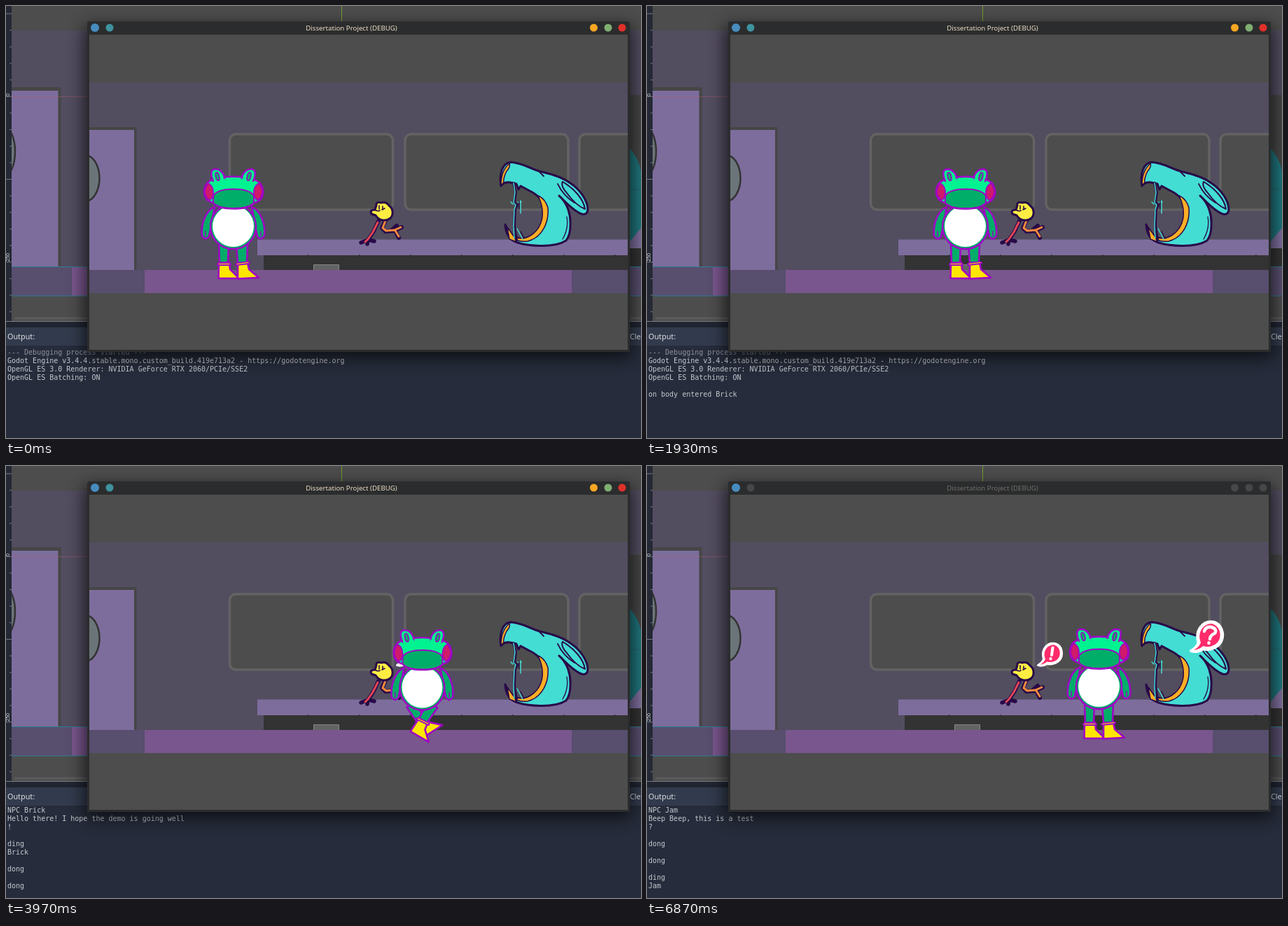
Recreate the animation shown at these times as an HTML page. Size 907 by 617 pixels, loop 6.91 s.

```html
<!DOCTYPE html>
<html lang="en">
<head>
<meta charset="utf-8">
<title>Frog walk</title>
<style>
html, body { margin: 0; height: 100%; overflow: hidden; background: #262c3b; }
svg { display: block; width: 100vw; height: 100vh; }
text { font-family: "Noto Sans", sans-serif; fill: #dcdee2; }
#log text { font: 10px "DejaVu Sans Mono", monospace; fill: #c6c9cf; }
#log text:first-child { opacity: .65; }
#frog { stroke: #a005c4; stroke-width: 2.6; stroke-linejoin: round; stroke-linecap: round; }
.ink { fill: none; stroke: #280a48; stroke-linecap: round; stroke-linejoin: round; }
</style>
</head>
<body>
<svg viewBox="0 0 907 617">
  <defs>
    <filter id="soft" x="-10%" y="-10%" width="120%" height="125%"><feGaussianBlur stdDeviation="12"/></filter>
    <clipPath id="view"><path d="M119 41H888V491H119Z"/></clipPath>
    <clipPath id="pane"><path d="M0 485H907V617H0Z"/></clipPath>
    <g id="bubble">
      <path d="M0 0Q6-3 8-9C4-22 13-33 24-31C36-28 37-11 28-5C22-1 17-1 13-2Q7 2 0 0Z" fill="#fff" stroke="#fff" stroke-width="3" stroke-linejoin="round"/>
      <path d="M3-1Q9-4 10.500-9C6-20 14-30 23-29C33-26 34-12 26-7C21-4 17-4 13-5Q8-1 3-1Z" fill="#ff2b6b"/>
    </g>
  </defs>

  <!-- editor behind -->
  <path d="M0 0H907V450H0Z" fill="#4d4d4d"/>
  <path d="M8 35H907V372H8Z" fill="#534d60"/>
  <path d="M8 116H78.500V372H8Z" fill="#464646"/>
  <path d="M8 121H74.500V372H8Z" fill="#7d6d9c"/>
  <ellipse cx="-4" cy="208" rx="17" ry="36" fill="#6b7579" stroke="#333" stroke-width="2.500"/>
  <path d="M8 129.500H907" stroke="#b06070" opacity=".45"/>
  <path d="M890 127H907V320H890Z" fill="#464646"/>
  <path d="M888 317H907V346H888Z" fill="#7d6d9c"/>
  <path d="M888 201Q903 214 907 236V317L888 340Z" fill="#1f757c"/>
  <path d="M888 262H907" stroke="#25626c"/>
  <path d="M888 346H907V372H888Z" fill="#333"/>
  <path d="M8 372H907V414H8Z" fill="#584e6e"/>
  <path d="M94 372H200V414H94Z" fill="#79568d"/>
  <path d="M8 372.500H907M8 414H907" stroke="#2c7f94"/>
  <path d="M12 446H907" stroke="#5c5c5e" stroke-width="3"/>
  <path d="M479.500 0V30" stroke="#73a32c"/>
  <path d="M0 0H8V450H0Z" fill="#242935"/>
  <g id="ruler" stroke="#747985"></g>
  <text transform="translate(5 129)rotate(-90)" font-size="7">0</text>
  <text transform="translate(5 365)rotate(-90)" font-size="7">250</text>
  <path d="M0 450H907V617H0Z" fill="#202531"/>
  <path d="M0 450.500H907" stroke="#7b7e86"/>
  <path d="M0 459H907V485H0Z" fill="#323b4d"/>
  <path d="M0 485H907V617H0Z" fill="#262c3b"/>
  <text x="2" y="475.500" font-size="10.800">Output:</text>
  <text x="891" y="475.500" font-size="10.800">Clear</text>
  <g clip-path="url(#pane)"><g id="log"></g></g>

  <!-- game window -->
  <rect x="112" y="28" width="782" height="474" fill="#000" opacity=".68" filter="url(#soft)"/>
  <path d="M116 494V25Q116 22 119 22H888Q891 22 891 25V494Z" fill="#2b2c2d"/>
  <circle cx="127" cy="31" r="6" fill="#478cbf"/>
  <text id="title" x="493.500" y="34.700" font-size="9.700" text-anchor="middle">Dissertation Project (DEBUG)</text>
  <g id="buttons"></g>

  <g clip-path="url(#view)">
    <path d="M119 41H888V491H119Z" fill="#4d4d4d"/>
    <path d="M119 109H888V378H119Z" fill="#534d60"/>
    <path d="M119 173H186.500V378H119Z" fill="#464646"/>
    <path d="M119 177H183V378H119Z" fill="#7d6d9c"/>
    <ellipse cx="113" cy="246" rx="20.500" ry="33" fill="#6b7579" stroke="#333" stroke-width="2.500"/>
    <g fill="#4d4d4d" stroke="#636363" stroke-width="3.500">
      <rect x="319.500" y="183" width="233" height="108" rx="9"/>
      <rect x="570" y="183" width="233" height="108" rx="9"/>
      <rect x="819" y="183" width="233" height="108" rx="9"/>
    </g>
    <path d="M359 333.500H888V356H359Z" fill="#7d6d9c"/>
    <path d="M368 356H888V378H368Z" fill="#333"/>
    <path d="M431 355.500H888" stroke="#333" stroke-dasharray="1.500 71.500"/>
    <path d="M439.500 369.500H475.500V379H439.500Z" fill="#636363" stroke="#858585"/>
    <path d="M119 377H888V410H119Z" fill="#584e6e"/>
    <path d="M198 377H808V410H198Z" fill="#79568d"/>

    <!-- Jam -->
    <g class="ink" stroke-width="3">
      <path d="M707 257C704 240 709 224 721 223C739 224 751 234 766 237C783 241 798 247 806 253C820 262 831 278 831 291Q830 299 822 297C812 293 801 282 790 271C802 281 807 298 806 314Q806 327 800 335C783 346 747 343 731 338Q714 333 713 312Q720 330 737 333C759 333 770 313 769 294C768 277 759 269 748 264L735 257L732 262L729 254L720 252Q711 251 707 257Z" fill="#43ddd4"/>
      <path d="M707 256Q707 235 719 225Q721 229 715 236Q710 246 711 252Z" fill="#ffae25" stroke-width="1.500"/>
      <path d="M760 271Q770 275 774 288C776 310 765 331 745 336Q729 338 719 327Q735 336 749 328C766 317 772 296 760 271Z" fill="#ffae25" stroke-width="1.500"/>
      <path d="M716 316L719 333L729 337L726 330Z" fill="#ffae25" stroke-width="1.500"/>
      <path d="M795 251C812 261 825 276 827 290Q814 285 801 267Q792 257 795 251" stroke-width="2"/>
      <path d="M788 254Q796 271 812 281M762 237L768 243" stroke-width="1.800"/>
      <path d="M725 253L728 266L726 281L730 284L727 291L726 314L729 334" stroke-width="3.800"/>
      <path d="M725 253L727 266L725 281L728 284L726 291L725 314L726 332" stroke="#43ddd4" stroke-width="1.500"/>
      <path d="M735 278V296M731 280H736M721 280L724 283M730 318L738 333" stroke="#43ddd4" stroke-width="1.500"/>
      <path d="M733 279V290M735 322L740 332M801 301Q804 318 795 333" stroke-width="1.300"/>
    </g>

    <!-- Brick -->
    <g class="ink">
      <path d="M543 304L537 317L542 322L555 321L565 316M556 321L561 331M552 319L558 314" stroke-width="6"/>
      <path d="M543 304L538 317L543 321L555 320L564 316M556 321L561 329" stroke="#f18a3e" stroke-width="3"/>
      <path d="M532 307L525 322L517 334L507 338M517 334L516 340M518 334L526 336" stroke-width="5.500"/>
      <path d="M531 309L524 323L517 333L513 337" stroke="#e84855" stroke-width="2.800"/>
      <path d="M529 285Q528 279 536 281Q543 279 547 285C554 290 553 299 549 303C543 308 533 307 528 299L522 297Q519 291 527 291Z" fill="#ffee42" stroke-width="3"/>
      <path d="M533 285V290M538 286V291M527 291Q531 294 534 292M537 291L541 289" stroke-width="1.600"/>
    </g>

    <g id="bang">
      <use href="#bubble"/>
      <path d="M21-25L19.500-14.500M18-9.500V-9" fill="none" stroke="#fff" stroke-width="4" stroke-linecap="round"/>
    </g>
    <g id="ask">
      <use href="#bubble" transform="scale(1.330)"/>
      <path d="M19-28Q21-35 29-34Q38-31 34-25Q27-22 27-17M25.500-11.500V-11" fill="none" stroke="#fff" stroke-width="4.500" stroke-linecap="round" stroke-linejoin="round"/>
    </g>

    <g id="frog">
      <g id="legL">
        <path d="M304 340H318L317 367H305Z" fill="#00ad69"/>
        <path d="M304 367L319 366L320 376L333 389H303.500Z" fill="#ffe600"/>
        <path d="M303 369H320" stroke-width="4"/><path d="M304 368.500H319" stroke="#ffe600" stroke-width="1"/>
      </g>
      <g id="legR">
        <path d="M329 340H345L344 367H331Z" fill="#00ad69"/>
        <path d="M331 367L345 366L347 376L361 388L331 389.500Z" fill="#ffe600"/>
        <path d="M329 369L347 367" stroke-width="4"/><path d="M330 368.500L346 366.500" stroke="#ffe600" stroke-width="1"/>
      </g>
      <g id="torso">
        <g id="arm">
          <path d="M298 287C286 291 278 311 280 328Q285 336 290 329L293 314Z" fill="#00ad69"/>
          <path d="M285 322V329" stroke-width="1.500"/>
        </g>
        <use href="#arm" transform="matrix(-1 0 0 1 649 0)"/>
        <ellipse cx="324.500" cy="315" rx="32.500" ry="32" fill="#00ad69"/>
        <ellipse cx="324.500" cy="314.500" rx="29.500" ry="29.500" fill="#fff" stroke="none"/>
        <path d="M283 264C284 252 292 247 304 246Q325 241 346 246C358 247 366 252 367 264C368 275 362 279 355 281Q347 289.500 325 289.500Q303 289.500 296 281C288 279 283 275 283 264Z" fill="#00f391"/>
        <g id="ear">
          <path d="M296 250C291 239 293 233 299 233C307 233 313 241 312 248" fill="#00f391"/>
          <path d="M298 249L312 248" stroke="#00f391"/>
          <ellipse cx="302" cy="243.500" rx="2.600" ry="6" transform="rotate(-14 302 243.500)" fill="#00ad69" stroke-width="1.600"/>
        </g>
        <use href="#ear" transform="matrix(-1 0 0 1 649 0)"/>
        <path d="M296 271Q302 261.500 325 261.500Q348 261.500 354 271L354 281Q347 289 325 289Q303 289 296 281Z" fill="#00ad69" stroke-width="2"/>
        <g fill="#cf1a6b" stroke-width="1.800">
          <path d="M288 253Q296 256 296 267Q295 277 290 277Q283 272 284 262Z"/>
          <path d="M362 253Q354 256 354 267Q355 277 360 277Q367 272 366 262Z"/>
        </g>
      </g>
    </g>
  </g>
</svg>
<script>
const LOOP = 6910, BOB = LOOP / 11, STRIDE = 420;
const $ = id => document.getElementById(id);
const clamp = v => Math.max(0, Math.min(1, v));
const place = (id, value) => $(id).setAttribute('transform', value);

const lines = `--- Debugging process started ---
Godot Engine v3.4.4.stable.mono.custom_build.419e713a2 - https://godotengine.org
OpenGL ES 3.0 Renderer: NVIDIA GeForce RTX 2060/PCIe/SSE2
OpenGL ES Batching: ON

on body entered Brick
NPC Brick
Hello there! I hope the demo is going well
!

ding
Brick

dong

dong
on body entered Jam
on body exited Brick
NPC Jam
Beep Beep, this is a test
?

dong

dong

ding
Jam`.split('\n');

// [time, number of lines printed]
const prints = [[0, 4], [1700, 6], [2150, 9], [2210, 12], [2310, 14], [2410, 16],
  [4200, 17], [4400, 18], [4900, 21], [4960, 23], [5060, 25], [5160, 28]];
// [start, end, from x, to x]
const walks = [[575, 1670, 325, 455], [2830, 3190, 455, 498], [3230, 4360, 498, 646]];
// [x, focused colour]
const buttons = [[148, [63, 146, 160]], [839.5, [246, 166, 35]], [860, [127, 174, 114]], [880, [224, 48, 42]]];

const mix = (a, b, k) => `rgb(${a.map((v, i) => v + (b[i] - v) * k)})`;

$('log').innerHTML = lines.map((s, i) => `<text x="2" y="${4.5 + 12 * i}">${s}</text>`).join('');
$('buttons').innerHTML = buttons.map(([x]) => `<circle cx="${x}" cy="31" r="5.5"/>`).join('');
for (let i = 0; i < 19; i++) {
  const y = 11 + i * 23.65;
  $('ruler').innerHTML += `<path d="M${i % 5 ? 5 : 0} ${y}H8"/>`;
}

function pop(id, x, y, t) {
  const k = clamp(t / 180);
  place(id, `translate(${x} ${y}) scale(${1 - (1 - k) ** 3})`);
}

function draw(t) {
  let x = 325, swing = 0;
  for (const [start, end, from, to] of walks) {
    if (t < start) break;
    x = from + (to - from) * clamp((t - start) / (end - start));
    swing = t < end ? 33 * Math.sin((t - start) / STRIDE * 2 * Math.PI) : 0;
  }
  const sink = (1 - Math.cos(t / BOB * 2 * Math.PI)) / 2;
  place('frog', `translate(${x - 325})`);
  place('legL', `rotate(${swing} 311 345)`);
  place('legR', `rotate(${-swing} 337 345)`);
  place('torso', `translate(${325 * 0.025 * sink} ${2.2 * sink}) scale(${1 - 0.025 * sink} 1)`);

  pop('bang', 558.5, 284.5, t - 2200);
  pop('ask', 777, 264, t - 4950);

  const count = prints.filter(p => p[0] <= t).pop()[1];
  place('log', `translate(0 ${Math.min(493, 598 - 12 * (count - 1))})`);
  [...$('log').children].forEach((el, i) => el.style.display = i < count ? '' : 'none');

  const dim = clamp((t - 6400) / 150);
  $('title').style.fill = mix([236, 224, 200], [112, 111, 108], dim);
  buttons.forEach(([, rgb], i) => $('buttons').children[i].style.fill = mix(rgb, [70, 71, 72], dim));
}

let origin;
function tick(now) {
  origin ??= now;
  draw((now - origin) % LOOP);
  requestAnimationFrame(tick);
}
draw(0);
requestAnimationFrame(tick);
</script>
</body>
</html>
```
